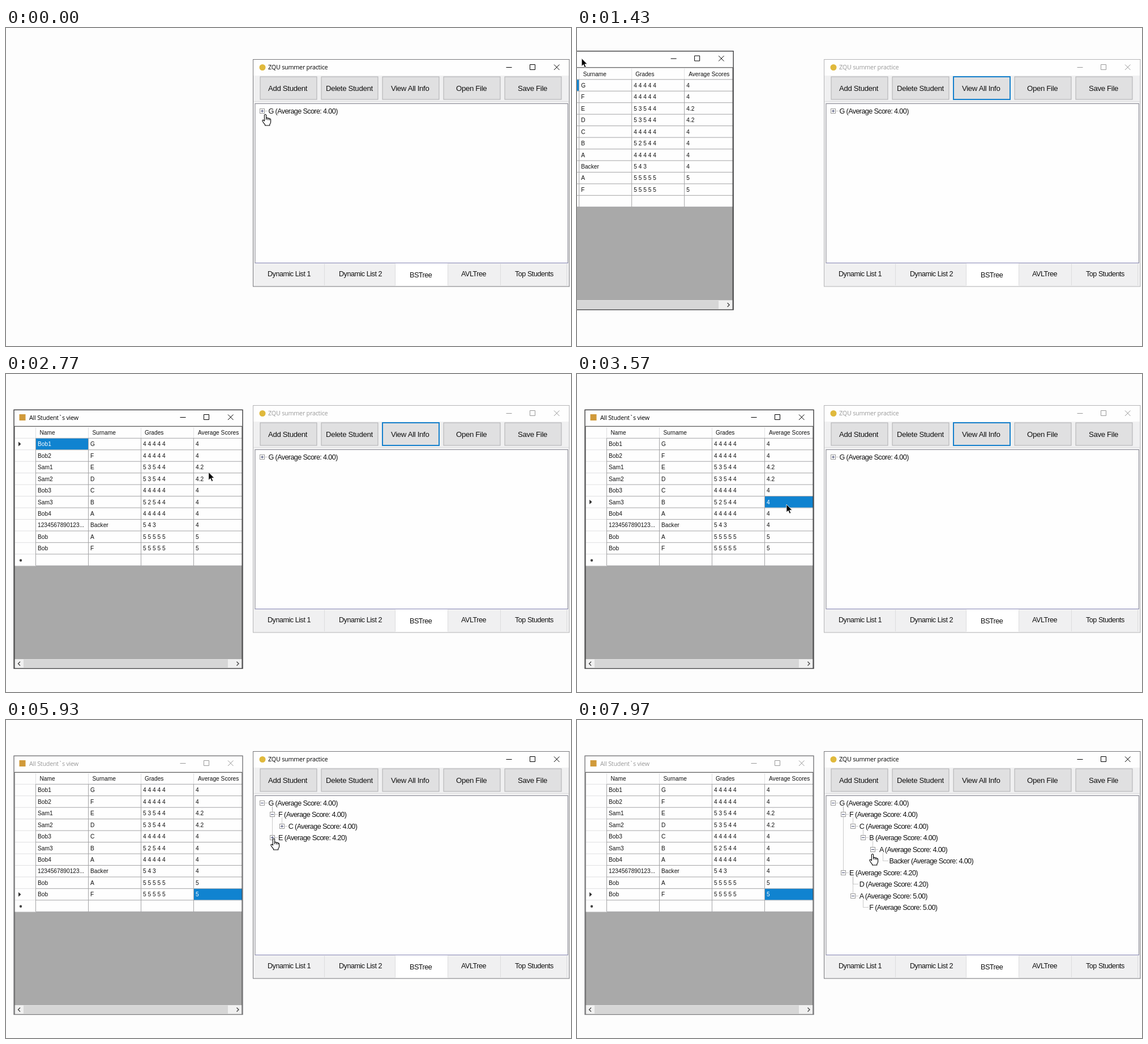
Write an HTML page that moves like this. It is 998 px wide and 561 px high and loops after 8 s.

```html
<!DOCTYPE html>
<html lang="en">
<head>
<meta charset="utf-8">
<title>Student tree</title>
<style>
html, body { margin: 0; width: 100%; height: 100%; overflow: hidden; background: #fdfdfd; }
svg { display: block; width: 100%; height: 100%; }
text { white-space: pre; fill: #111; }
.cap { font: 10.8px "Open Sans", "Noto Sans", sans-serif; letter-spacing: -.24px; fill: #000; }
.btn { font: 13.2px "Liberation Sans", Arial, sans-serif; letter-spacing: -.32px; }
.tab { font: 12.6px "Liberation Sans", Arial, sans-serif; letter-spacing: -.47px; }
.node { font: 12.6px "Liberation Sans", Arial, sans-serif; letter-spacing: -.61px; }
.cell { font: 10.2px "Liberation Sans", Arial, sans-serif; }
.ctl { fill: none; stroke: #000; }
.frame { fill: none; stroke: #77777a; }
.off .cap { fill: #999; }
.off .ctl { stroke: #999; }
.off .frame { stroke: #b4b4b6; }
#list .frame { stroke: #3c3c3e; stroke-width: 1.4; }
#list.off .frame { stroke: #77777a; }
.dots { fill: none; stroke: #999; stroke-dasharray: 1 1; }
</style>
</head>
<body>
<svg viewBox="0 0 998 561" preserveAspectRatio="none">
  <g id="main"></g>
  <g id="tree"></g>
  <g id="list"></g>
  <g id="arrow"><path d="M0 0V14L3.2 11L5.4 16.2L7.8 15.2L5.6 10.2H10Z" fill="#000" stroke="#fff" stroke-width=".8"/></g>
  <g id="hand" stroke="#000" stroke-width="1.1" stroke-linejoin="round">
    <path fill="#fff" d="M-1.6 1.6Q0-1 1.6 1.6V7Q3.6 5.6 4.6 7.4Q6.6 6.4 7.4 8.2Q9.6 7.6 9.6 10V14Q9.6 16.5 7.8 18V20H-.4V18.6Q-3 15.5-5 12.2Q-5.4 9.6-3.2 10.4L-1.6 12Z"/>
    <path fill="none" d="M1.6 7V10M4.6 7.4V10.4M7.4 8.2V10.8"/>
  </g>
</svg>
<script>
const LOOP = 8000;
const ROW = 20.45;
const OPENED = 970, DEACTIVATED = 700, REACTIVATED = 5140;
const GRAB = [150, 76];

const byId = id => document.getElementById(id);
const text = (cls, x, y, s, fill) =>
  `<text class="${cls}" x="${x}" y="${y}"${fill ? ` style="fill:${fill}"` : ''}>${s}</text>`;
const rect = (x, y, w, h, fill, extra = '') =>
  `<rect x="${x}" y="${y}" width="${w}" height="${h}" fill="${fill}" ${extra}/>`;
const path = (d, stroke, extra = '') => `<path d="${d}" fill="none" stroke="${stroke}" ${extra}/>`;
const controls = (x, y) =>
  `<path class="ctl" d="M${x - 4.5} ${y + .5}h10M${x + 37.5} ${y - 4.5}h9v9h-9zM${x + 80} ${y - 4.5}l9.5 9.5m0-9.5l-9.5 9.5"/>`;

// Main window
const BUTTONS = [['Add Student', 463], ['Delete Student', 565], ['View All Info', 680], ['Open File', 795], ['Save File', 904]];
const TABS = [['Dynamic List 1', 462], ['Dynamic List 2', 588], ['BSTree', 713], ['AVLTree', 804], ['Top Students', 899]];

byId('main').innerHTML =
  rect(436, 55, 559, 401, '#f0f0f1') + rect(437, 56, 557, 28, '#fefefe') +
  '<circle cx="453" cy="69.5" r="5.5" fill="#e0b93c"/>' +
  text('cap', 463, 73.3, 'ZQU summer practice') + controls(888, 69) +
  BUTTONS.map(([label, x], i) =>
    rect(449 + 108 * i, 86, 100, 40, '#e0e0e1', `stroke="#adadb0" ${i === 2 ? 'id="view"' : ''}`) +
    text('btn', x, 111.3, label)).join('') +
  path('M437 129.5H995', '#dededf') +
  rect(440, 133.5, 552.5, 281, '#fefefe', 'stroke="#83838e"') +
  path('M440 414.5H993', '#8585b4') +
  rect(688, 415, 92, 40, '#fff') +
  path('M562.5 416V454M687.5 416V454M780.5 416V454M873.5 416V454M990.5 416V454', '#dcdcde') +
  TABS.map(([label, x], i) => text('tab', x, i === 2 ? 439.5 : 437.8, label)).join('') +
  '<rect class="frame" x="436.5" y="55.5" width="558.5" height="400.5"/>';

// Student list window
const COLUMNS = [53, 146, 239, 332, 417];
const STUDENTS = [
  ['Bob1', 'G', '4 4 4 4 4', '4'], ['Bob2', 'F', '4 4 4 4 4', '4'],
  ['Sam1', 'E', '5 3 5 4 4', '4.2'], ['Sam2', 'D', '5 3 5 4 4', '4.2'],
  ['Bob3', 'C', '4 4 4 4 4', '4'], ['Sam3', 'B', '5 2 5 4 4', '4'],
  ['Bob4', 'A', '4 4 4 4 4', '4'], ['1234567890123...', 'Backer', '5 4 3', '4'],
  ['Bob', 'A', '5 5 5 5 5', '5'], ['Bob', 'F', '5 5 5 5 5', '5']
];
const rowTop = i => 113.3 + ROW * i;
const gridBottom = rowTop(11);
const cellText = (row, col, fill) => text('cell', COLUMNS[col] + 3, rowTop(row) + 14, STUDENTS[row][col], fill);
const gridLines = () => {
  let d = COLUMNS.slice(0, 4).map(x => `M${x - .5} 113V${gridBottom}`).join('');
  for (let i = 0; i <= 11; i++) d += `M53 ${rowTop(i)}H417`;
  return path(d, '#a3a3a5');
};
const headerLines = () => {
  let d = COLUMNS.slice(0, 4).map(x => `M${x - .5} 94V113`).join('');
  for (let i = 0; i <= 11; i++) d += `M16 ${rowTop(i)}H53`;
  return path(d, '#e0e0e2');
};

byId('list').innerHTML =
  rect(14, 63, 404, 457, '#fefefe') +
  rect(23.5, 71, 11, 11, '#d09a3a') +
  text('cap', 41, 80.6, 'All Student\u0060s view') + controls(312, 76) +
  rect(15, gridBottom, 402, 503 - gridBottom, '#a9a9a9') +
  headerLines() + gridLines() +
  [['Name', 59.5], ['Surname', 152.5], ['Grades', 245], ['Average Scores', 339]]
    .map(([label, x]) => text('cell', x, 107, label)).join('') +
  STUDENTS.map((s, r) => s.map((_, c) => cellText(r, c)).join('')).join('') +
  '<circle cx="26" cy="328.7" r="2.2" fill="#444"/><g id="selection"></g>' +
  rect(15, 503, 402, 16, '#f0f0f0') + rect(31, 503.5, 361, 14.5, '#d6d6d6') +
  path('M25 507.5l-3.5 3.5 3.5 3.5M407.5 507.5l3.5 3.5-3.5 3.5', '#444', 'stroke-width="1.4"') +
  path('M15 519V92.3H417V519', '#333') +
  '<rect class="frame" x="14" y="63.3" width="404" height="456.2"/>';

function selectionMarkup(row, col) {
  const x = COLUMNS[col], y = rowTop(row);
  return rect(x, y + .5, COLUMNS[col + 1] - x - (col < 3 ? 1 : 0), ROW - 1, '#1083d0') + cellText(row, col, '#fff') +
    `<path d="M22 ${y + 6.3}l4.5 4-4.5 4z" fill="#333"/>`;
}

// Tree nodes carry the moment at which they expand
const node = (name, score, opens, ...children) => ({ name, score, opens, children });
const ROOT =
  node('G', '4.00', REACTIVATED,
    node('F', '4.00', 5520,
      node('C', '4.00', 6850,
        node('B', '4.00', 7240,
          node('A', '4.00', 7680, node('Backer', '4.00'))))),
    node('E', '4.20', 6030,
      node('D', '4.20'),
      node('A', '5.00', 6430, node('F', '5.00'))));

function treeMarkup(t) {
  let row = 0, lines = '', items = '';
  const visit = (n, depth, parentY) => {
    const x = Math.round(453 + 17.6 * depth) - .5;
    const y = Math.round(146 + ROW * row++) + .5;
    const open = t >= n.opens;
    if (depth) lines += `M${x} ${parentY + 6}V${y}`;
    lines += `M${x} ${y}H${x + 9}`;
    if (n.children.length) {
      items += rect(x - 4, y - 4, 8, 8, '#fefefe', 'stroke="#999"') +
        path(`M${x - 2.5} ${y}h5` + (open ? '' : `M${x} ${y - 2.5}v5`), '#444a70');
    }
    items += text('node', 463.5 + 17.6 * depth, y + 4, `${n.name} (Average Score: ${n.score})`);
    if (open) n.children.forEach(c => visit(c, depth + 1, y));
  };
  visit(ROOT, 0, 0);
  return `<path class="dots" d="${lines}"/>` + items;
}

// Motion tables: time, x, y
const CURSOR = [
  [0, 458, 152], [90, 458, 152], [460, 712, 108], [620, 712, 108], [830, 303, 62], [970, 303, 62],
  [1140, -251, -32], [1250, -251, -32], [1550, 146, 99], [1690, 150, 76], [1770, 150, 76],
  [1960, 158, 306], [2200, 162, 304], [2620, 340, 180], [2900, 372, 168], [3220, 370, 230], [3640, 370, 230],
  [4000, 368, 309], [4250, 368, 309], [4780, 461, 155], [4900, 461, 155], [5060, 454, 147], [5200, 454, 147],
  [5440, 471, 168], [5600, 471, 168], [5880, 473, 209], [6080, 473, 209], [6360, 489, 250], [6520, 489, 250],
  [6780, 489, 189], [6920, 489, 189], [7170, 507, 210], [7310, 507, 210], [7590, 523, 230], [7740, 523, 230],
  [7930, 522, 236], [LOOP, 522, 236]
];
const SELECTED = [[0, 0, 0], [3300, 5, 3], [4120, 9, 3]];

function cursorAt(t) {
  const i = CURSOR.findIndex(k => k[0] > t);
  const [t0, x0, y0] = CURSOR[i - 1], [t1, x1, y1] = CURSOR[i];
  const p = (t - t0) / (t1 - t0), e = p * p * (3 - 2 * p);
  return [x0 + (x1 - x0) * e, y0 + (y1 - y0) * e];
}

const cache = {};
function fill(id, markup) {
  if (cache[id] !== markup) byId(id).innerHTML = cache[id] = markup;
}
const show = (id, on) => byId(id).setAttribute('visibility', on ? 'visible' : 'hidden');
const move = (id, x, y) => byId(id).setAttribute('transform', `translate(${x.toFixed(2)} ${y.toFixed(2)})`);

function render(t) {
  const [x, y] = cursorAt(t);
  const inactive = t >= DEACTIVATED && t < REACTIVATED;
  byId('main').setAttribute('class', inactive ? 'off' : '');
  byId('list').setAttribute('class', t >= REACTIVATED ? 'off' : '');

  const hovered = t > 420 && t < 650;
  const focused = t > 570 && t < REACTIVATED;
  const view = byId('view');
  view.setAttribute('fill', hovered ? '#e3eef8' : '#e0e0e1');
  view.setAttribute('stroke', hovered || focused ? '#1580cc' : '#adadb0');
  view.setAttribute('stroke-width', focused ? 2 : 1);

  const dragged = t < 1690;
  const [dragX, dragY] = cursorAt(Math.max(t, 1250));
  move('list', dragged ? dragX - GRAB[0] : 0, dragged ? dragY - GRAB[1] : 0);
  show('list', t >= OPENED);

  const [, row, col] = SELECTED.filter(s => s[0] <= t).pop();
  fill('selection', selectionMarkup(row, col));
  fill('tree', treeMarkup(t));

  const overTree = x > 440 && x < 993 && y > 133 && y < 414;
  show('hand', overTree);
  show('arrow', !overTree);
  move('hand', x, y);
  move('arrow', x, y);
}

const start = performance.now();
function tick() {
  render((performance.now() - start) % LOOP);
  requestAnimationFrame(tick);
}
tick();
</script>
</body>
</html>
```
